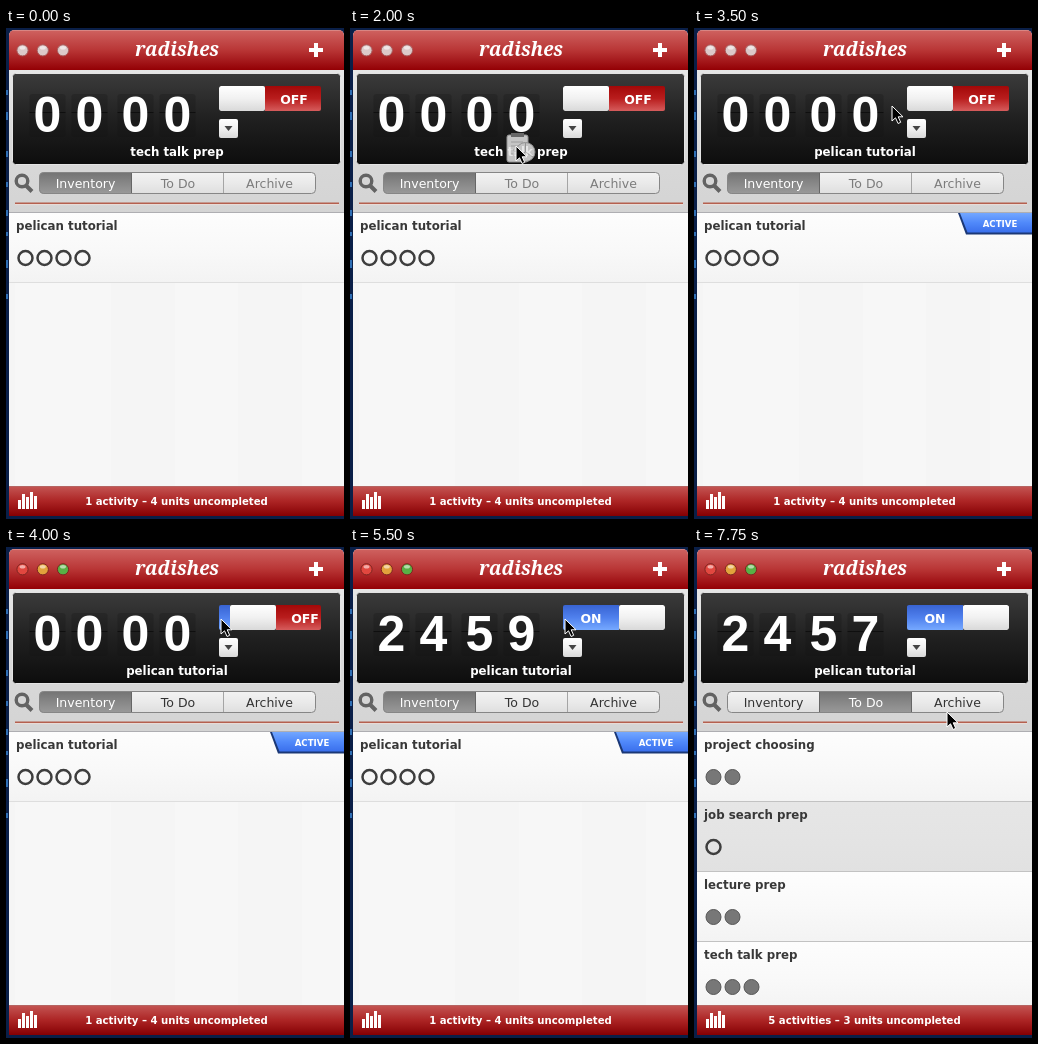
Animation of 338 by 491 pixels, one loop 8000 ms. Source, as an HTML page:

```html
<!DOCTYPE html>
<html lang="en">
<head>
<meta charset="utf-8">
<title>Activity timer</title>
<style>
  html, body { margin: 0; width: 100%; height: 100%; overflow: hidden; background: #0a1f48; }
  svg { display: block; width: 338px; height: 491px; }
  text { font: 12.5px "DejaVu Sans", "Noto Sans", sans-serif; }
  .mid { text-anchor: middle; }
  .bold { font-weight: 700; font-size: 11.8px; }
  .white { fill: #fff; }
  .dark { fill: #383838; }
  .brand { font: italic 700 19px "Noto Serif", serif; }
  .digit { font: 700 50px "Liberation Sans", Arial, sans-serif; }
  .small { font-size: 10.15px; }
  .tiny { font-size: 8.6px; }
  .switch { font-size: 12.5px; }
</style>
</head>
<body>
<svg viewBox="0 0 338 491">
  <defs id="defs">
    <clipPath id="window"><path d="M3 488V8Q3 2 9 2H332Q338 2 338 8V488Z"/></clipPath>
    <clipPath id="list"><path d="M3 185H338V458H3Z"/></clipPath>
    <clipPath id="slot"><rect x="213" y="58" width="102" height="25" rx="2"/></clipPath>
    <clipPath id="segments"><rect x="33.5" y="144.5" width="276" height="21" rx="4"/></clipPath>
  </defs>

  <path d="M1 62v5M1 84v8M1 123v6M1 154v5M1 182v6M1 204v4M1 232v8M1 266v5" stroke="#2f6fb5" stroke-width="2"/>

  <g clip-path="url(#window)">
    <rect x="3" y="2" width="335" height="486" fill="#f7f7f7"/>
    <path d="M-23 255V458M137 255V458M264 255V458" stroke="#f5f5f5" stroke-width="64"/>
    <rect x="3" y="2" width="335" height="40" fill="url(#header)"/>
    <path d="M3 2.5H338" stroke="#d88583"/>
    <g id="lights"></g>
    <text class="brand white mid" x="171" y="28">radishes</text>
    <path d="M303 22H317M310 15V29" stroke="#fff" stroke-width="4"/>

    <rect x="3" y="42" width="335" height="143" fill="url(#panel)"/>
    <rect x="6.5" y="45.5" width="328" height="91" rx="3" fill="url(#display)" stroke="#e4e4e4"/>
    <g id="clock"></g>
    <text id="task" class="bold white mid" x="171" y="128"></text>

    <g clip-path="url(#slot)">
      <g id="toggle">
        <rect x="213" y="58" width="56" height="25" fill="url(#blue)"/>
        <rect x="315" y="58" width="56" height="25" fill="url(#red)"/>
        <rect x="269" y="58" width="46" height="25" rx="2" fill="url(#knob)"/>
        <text class="bold white mid switch" x="241" y="76">ON</text>
        <text class="bold white mid switch" x="344" y="76">OFF</text>
      </g>
    </g>
    <rect x="213" y="91" width="19" height="19" rx="2" fill="url(#knob)"/>
    <path d="M218.5 98H226.5L222.5 103Z" fill="#444"/>

    <circle cx="16" cy="153" r="5.8" fill="none" stroke="#636363" stroke-width="3.4"/>
    <path d="M20 157.5L26 163.5" stroke="#636363" stroke-width="4"/>
    <g clip-path="url(#segments)">
      <rect x="33" y="144" width="277" height="22" fill="url(#segment)"/>
      <path d="M125.5 145V165M217.5 145V165" stroke="#a5a5a5"/>
      <rect id="selected" y="144.5" height="21" fill="url(#pressed)" stroke="#666"/>
    </g>
    <rect x="33.5" y="144.5" width="276" height="21" rx="4" fill="none" stroke="#868686"/>
    <g id="tabs"></g>
    <path d="M9 175.3H333" stroke="#b5604f" stroke-width="1.4"/>
    <path d="M9 176.6H333" stroke="#e9dcd8"/>
    <path d="M3 184.5H338" stroke="#aeaeb2"/>

    <g clip-path="url(#list)">
      <g id="inventory"></g>
      <g id="todo"></g>
      <g id="ribbon">
        <path d="M264 185H338V206.5H272Z" fill="#1b3876"/>
        <path d="M266 185H338V204.5H273.5Z" fill="url(#badge)"/>
        <text class="bold white mid tiny" x="306" y="199">ACTIVE</text>
      </g>
    </g>

    <rect x="3" y="458" width="335" height="30" fill="url(#footer)"/>
    <path d="M3 458.5H338" stroke="#b56462"/>
    <path d="M13.5 481V472M17.5 481V466M21.5 481V469M25.5 481V464M29.5 481V468" stroke="#fff" stroke-width="3"/>
    <text id="summary" class="bold white mid small" x="170.5" y="477"></text>
  </g>

  <g id="dragged" opacity=".85">
    <rect x="1" y="2" width="21" height="27" rx="2" fill="#e4e4e4" stroke="#a8a8a8"/>
    <path d="M5 4V0H18V4Z" fill="#777"/>
    <path d="M5 9H17M5 13H15M5 17H12M5 21H11" stroke="#b5b5b5"/>
    <circle cx="19.5" cy="19" r="9.5" fill="#e2e2e2" stroke="#a5a5a5"/>
    <path d="M19.5 19V10M19.5 19L27 24M19.5 19L12 23" stroke="#aaa" fill="none"/>
  </g>
  <path id="cursor" d="M0 0V15L3.5 11.8L6.1 17.5L8.7 16.3L6.2 10.8H11Z" fill="#000" stroke="#fff" stroke-linejoin="round"/>
</svg>

<script>
const LOOP = 8000;
const el = id => document.getElementById(id);
const show = (id, on) => el(id).style.display = on ? "" : "none";
const range = n => [...Array(n).keys()];

const gradients = {
  header: ["#cf6260", "#b93636", "#930005"],
  footer: ["#c45654", "#ad2525", "#850003"],
  panel: ["#e6e6e6", "#d9d9d9", "#d4d4d4"],
  display: ["#3b3b3b", "#202020", "#0d0d0d"],
  blue: ["#3863d2", "#4f80ed", "#76a9ff"],
  red: ["#a30808", "#b91d1d", "#d65c5c"],
  knob: ["#ffffff", "#f1f1f1", "#d9d9d9"],
  segment: ["#f3f3f3", "#eaeaea", "#dedede"],
  pressed: ["#747474", "#878787", "#999999"],
  badge: ["#73a7ff", "#5089fa", "#3a6fec"],
  pale: ["#fdfdfd", "#f9f9f9", "#f3f3f3"],
  shaded: ["#e6e6e6", "#e4e4e4", "#e1e1e1"]
};
el("defs").innerHTML += Object.entries(gradients).map(([id, colors]) =>
  `<linearGradient id="${id}" x2="0" y2="1">${colors.map((c, i) =>
    `<stop offset="${i / 2}" stop-color="${c}"/>`).join("")}</linearGradient>`).join("");

function row(y, title, count, done, fill = "pale", line = "#c2c2c2") {
  const marks = range(count).map(i => {
    const place = `cx="${19.5 + 19 * i}" cy="${y + 45}"`;
    return done ? `<circle ${place} r="7.5" fill="#777" stroke="#565656"/>`
                : `<circle ${place} r="7" fill="none" stroke="#3e3e3e" stroke-width="2.5"/>`;
  });
  return `<rect x="3" y="${y}" width="335" height="70" fill="url(#${fill})"/>
    <path d="M3 ${y + 69.5}H338" stroke="${line}"/>
    <text class="bold dark" x="10" y="${y + 17}">${title}</text>${marks.join("")}`;
}
el("inventory").innerHTML = row(185, "pelican tutorial", 4, false, "pale", "#dedede");
el("todo").innerHTML =
  row(185, "project choosing", 2, true) +
  row(255, "job search prep", 1, false, "shaded") +
  row(325, "lecture prep", 2, true) +
  row(395, "tech talk prep", 3, true);

el("lights").innerHTML = [16.5, 36.8, 57].map(x =>
  `<circle cx="${x}" cy="22.3" r="5.6"/><ellipse cx="${x}" cy="19.7" rx="3" ry="1.8" fill="#fff" opacity=".55"/>`).join("");
el("clock").innerHTML = [41.5, 83.5, 129.5, 171.5].map(x =>
  `<rect x="${x - 18}" y="66" width="36" height="43" rx="3" fill="#111" opacity=".25"/>
   <path d="M${x - 18} 84.5h36" stroke="#000" opacity=".5"/>
   <text class="digit white mid" x="${x}" y="104"></text>`).join("");
el("tabs").innerHTML = [["Inventory", 79.5], ["To Do", 172], ["Archive", 263.5]].map(([name, x]) =>
  `<text class="mid" x="${x}" y="160">${name}</text>`).join("");

const lights = document.querySelectorAll("#lights circle");
const digits = document.querySelectorAll(".digit");
const tabs = document.querySelectorAll("#tabs text");

// Every track holds its value until the next listed time.
const pointer = [
  [0, -50, 0], [500, 195, 243], [750, 171, 244], [1500, 172, 199], [1750, 169, 168],
  [2000, 166, 118], [2250, 160, 99], [2500, 161, 101], [3500, 198, 78], [3750, 214, 71],
  [4000, 215, 72], [6500, 214, 83], [6750, 208, 151], [7000, 199, 167], [7250, 196, 161],
  [7750, 253, 165]
];
const timer = [[0, "0000"], [4500, "2500"], [5500, "2459"], [6500, "2458"], [7500, "2457"]];
const slide = [[0, -56], [4000, -45], [4250, 0]];
const at = (track, t) => track.findLast(step => step[0] <= t).slice(1);

function draw(t) {
  const focused = t >= 4000, assigned = t >= 2500, todo = t >= 7500;
  const [x, y] = at(pointer, t);
  el("cursor").setAttribute("transform", `translate(${x} ${y})`);
  el("dragged").setAttribute("transform", `translate(${x - 10} ${y - 13})`);
  show("dragged", t >= 1500 && !assigned);
  show("ribbon", assigned && !todo);
  show("inventory", !todo);
  show("todo", todo);

  const [time] = at(timer, t);
  digits.forEach((d, i) => d.textContent = time[i]);
  el("toggle").setAttribute("transform", `translate(${at(slide, t)[0]} 0)`);
  el("task").textContent = assigned ? "pelican tutorial" : "tech talk prep";
  el("summary").textContent = todo ? "5 activities – 3 units uncompleted" : "1 activity – 4 units uncompleted";

  const colors = focused ? ["#e2473f", "#e2a23c", "#58b045"] : ["#dcc9c9", "#dcc9c9", "#dcc9c9"];
  lights.forEach((c, i) => {
    c.setAttribute("fill", colors[i]);
    c.setAttribute("stroke", focused ? "#7d2420" : "#a85c5c");
  });
  tabs.forEach((tab, i) =>
    tab.setAttribute("fill", i === +todo ? "#fff" : focused ? "#333" : "#7c7c7c"));
  el("selected").setAttribute("x", todo ? 125.5 : 33.5);
  el("selected").setAttribute("width", 92);
}

const start = performance.now();
function tick() {
  draw((performance.now() - start) % LOOP);
  requestAnimationFrame(tick);
}
tick();
</script>
</body>
</html>
```
